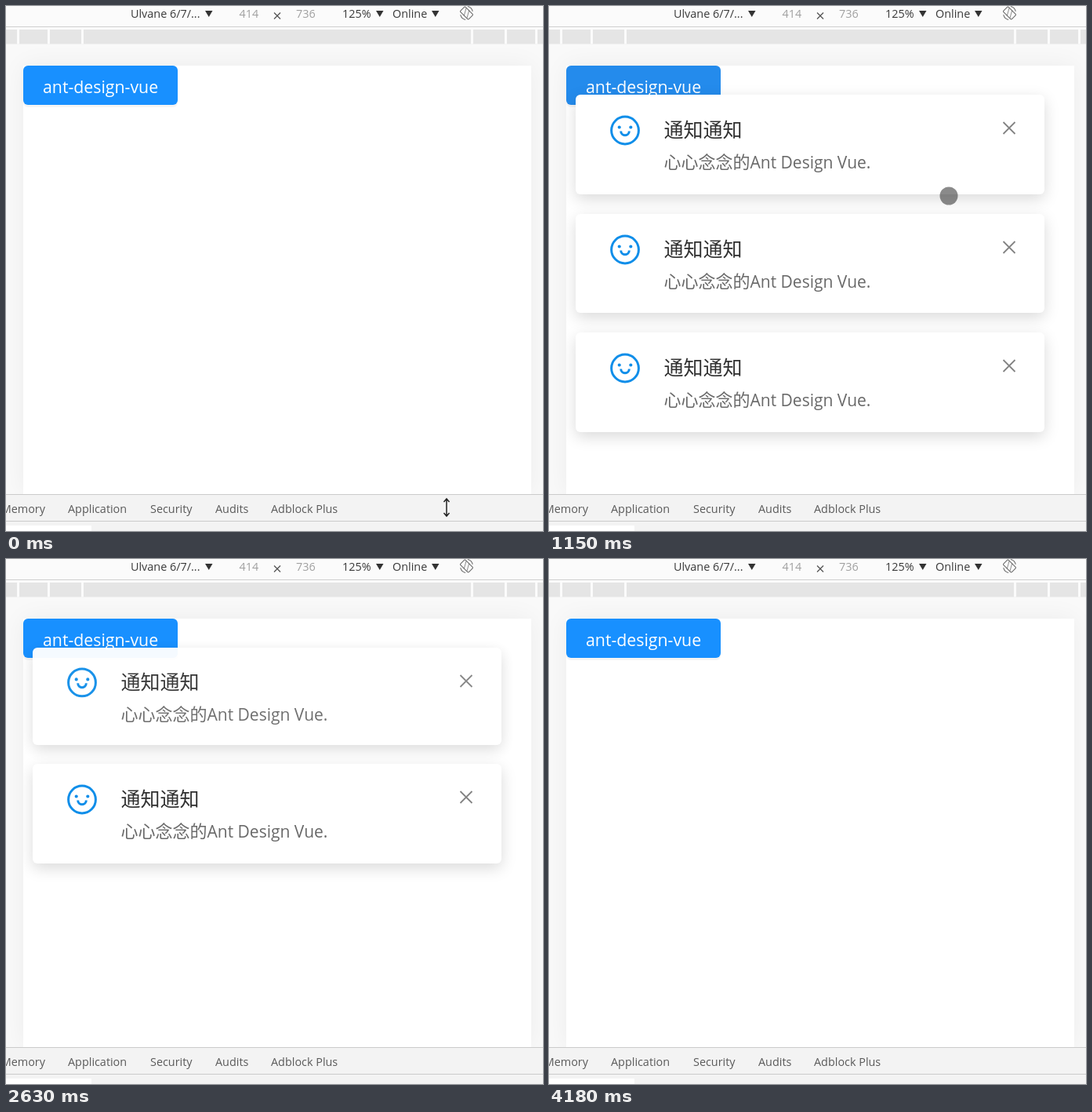
Recreate the animation shown at these times as an HTML page. Size 685x669 px, loop 4.73 s.

```html
<!DOCTYPE html>
<html lang="en">
<head>
<meta charset="utf-8">
<title>Notification demo</title>
<style>
  html, body { margin: 0; width: 100%; height: 100%; overflow: hidden; background: #f9f9f9; }
  body { position: relative; font-family: "Open Sans", "Noto Sans", sans-serif; }
  svg { position: absolute; left: 0; top: 0; overflow: hidden; }
  #device {
    position: absolute; left: 22px; top: 76px; width: 648px; height: 546px;
    overflow: hidden; background: #fff; box-shadow: 0 0 30px rgba(0, 0, 0, .055);
  }
  #button {
    position: absolute; left: 0; top: 0; width: 197px; height: 50px;
    border-radius: 6px; box-shadow: 0 3px 0 rgba(0, 0, 0, .045);
  }
  .notice {
    position: absolute; width: 598px; overflow: hidden; background: #fff;
    border-radius: 6px; box-shadow: 0 6px 19px rgba(0, 0, 0, .15);
  }
  .close { stroke: #838383; stroke-width: 1.8; }
  .ring { display: none; fill: none; stroke: #dfa23c; stroke-width: 1.8; }
  .focused .close { stroke: #5a5a5a; }
  .focused .ring { display: inline; }
  .cjk { font-family: "Noto Sans CJK SC", "Noto Sans CJK", sans-serif; }
  .ui text { font-size: 14.4px; fill: #5a5a5a; }
  .ui .dim { fill: #a0a0a0; }
  .ui .dark { fill: #3a3a3a; }
</style>
</head>
<body>
<div id="device">
  <div id="button">
    <svg width="197" height="50"><text x="25" y="34.5" font-size="21.3" fill="#fff">ant-design-vue</text></svg>
  </div>
</div>

<svg class="ui" width="685" height="669">
  <rect width="685" height="49" fill="#fbfbfb"/>
  <rect y="26" width="685" height="1" fill="#cfcfcf"/>
  <rect y="30" width="685" height="18.5" fill="#e5e5e5"/>
  <g id="gaps" fill="#fbfbfb"></g>
  <text class="dark" x="159" y="15">Ulvane 6/7/...</text>
  <text class="dim" x="297.5" y="15">414</text>
  <path d="M342 8.500l8 8m0-8l-8 8" stroke="#555" stroke-width="1.3"/>
  <text class="dim" x="370" y="15">736</text>
  <text class="dark" x="429" y="15">125%</text>
  <text class="dark" x="493" y="15">Online</text>
  <path d="M254 6h9.500l-4.750 8zM472 6h9.500l-4.750 8zM543 6h9.500l-4.750 8z" fill="#333"/>
  <g transform="translate(587.5 9) rotate(-45)" fill="none" stroke="#666">
    <rect x="-4.500" y="-7.500" width="9" height="15" rx="1.500"/>
    <path d="M-4.500 0l9 -5M-4.500 5l9 -5" stroke-width=".7"/>
    <path d="M7 -5a8.500 8.500 0 0 1 0 9M-7 5a8.500 8.500 0 0 1 0 -9"/>
  </g>

  <rect y="622" width="685" height="47" fill="#f3f3f3"/>
  <rect y="622" width="685" height="1" fill="#cbcbcb"/>
  <rect y="656" width="685" height="1" fill="#cbcbcb"/>
  <rect y="662" width="109" height="7" fill="#fff"/>
  <text x="50" y="646" text-anchor="end">Memory</text>
  <text x="79" y="646">Application</text>
  <text x="184" y="646">Security</text>
  <text x="267" y="646">Audits</text>
  <text x="338" y="646">Adblock Plus</text>

  <g id="cursor">
    <path id="resize" d="M0 -10V10M-3.500 -7L0 -11L3.500 -7M-3.500 7L0 11L3.500 7" fill="none" stroke="#222" stroke-width="1.5"/>
    <g id="touch">
      <circle id="halo" r="15" fill="rgba(245,245,20,.58)"/>
      <circle id="dot" r="11.5"/>
    </g>
    <path id="beam" d="M-4 -11.500h3l1 1l1 -1h3M0 -10.500V10.500M-4 11.500h3l1 -1l1 1h3" fill="none" stroke="#222" stroke-width="1.6"/>
  </g>
</svg>

<script>
const LOOP = 4730, TICK = 1000 / 13, FADE = 240;
const HEIGHT = 126.5, GAP = 25, SLIDE = 600;
const BLUE = [24, 144, 255], PRESSED = [9, 109, 217], FOCUSED = [64, 169, 255];

const taps = [0, 1, 2].map(i => 530 + 155 * i);
const closeTap = 1610, closeStart = 1669;
const leaves = [2563, closeStart, 3912];

// Where the pointer rests or turns.
const stops = [
  { t: 0, x: 562, y: 639 }, { t: 535, x: 156, y: 95 }, { t: 930, x: 156, y: 95 },
  { t: 1154, x: 510, y: 242 }, { t: 1400, x: 587, y: 307 },
  { t: 1690, x: 587, y: 307 }, { t: 1769, x: 605, y: 307 }
];

const $ = id => document.getElementById(id);
const mix = (a, b, k) => a + (b - a) * k;
const mixColor = (a, b, k) => a.map((v, i) => mix(v, b[i], k));
const clamp = v => Math.min(1, Math.max(0, v));
const ease = v => v < .5 ? 4 * v ** 3 : 1 - (2 - 2 * v) ** 3 / 2;
const progress = (t, start) => ease(clamp((t - start) / FADE));
const show = (el, on) => { el.style.display = on ? "" : "none"; };

function pointerAt(t) {
  const i = stops.findIndex(s => s.t > t);
  if (i < 0) return stops.at(-1);
  const a = stops[i - 1], b = stops[i], k = (t - a.t) / (b.t - a.t), out = k * (2 - k);
  return { x: mix(a.x, b.x, out), y: mix(a.y, b.y, out) };
}

function makeNotice(enter, i) {
  const el = document.createElement("div");
  el.className = "notice";
  el.innerHTML = `<svg width="598" height="127">
    <g class="content">
      <g transform="translate(63 45.5)" fill="none" stroke="#108ee9" stroke-width="3">
        <circle r="17.4"/>
        <path d="M-5.300 .9a5.300 5.300 0 0 0 10.600 0"/>
        <path d="M-7.300 -4h.01M7.300 -4h.01" stroke-width="4.2" stroke-linecap="round"/>
      </g>
      <text class="cjk" x="112.5" y="54" font-size="25" fill="#303030">通知通知</text>
      <text x="112.5" y="94" font-size="21" fill="#696969"><tspan class="cjk" font-size="22">心心念念的</tspan>Ant Design Vue.</text>
    </g>
    <path class="close" d="M545.500 35l15 15m0 -15l-15 15"/>
    <rect class="ring" x="541.5" y="25" width="23" height="32.5" rx="2"/>
  </svg>`;
  $("device").append(el);
  return { el, content: el.querySelector(".content"), enter, leave: leaves[i] };
}

function drawNotices(t) {
  let top = 37;
  for (const { el, content, enter, leave } of notices) {
    const visible = t >= enter && t < leave + FADE;
    show(el, visible);
    if (!visible) continue;
    const seen = progress(t, enter), gone = progress(t, leave);
    const height = Math.min(HEIGHT - 2 * GAP * gone, 234 * (1 - gone));
    Object.assign(el.style, {
      left: 12 + SLIDE * (1 - seen) + "px",
      top: top + "px",
      height: height + "px",
      opacity: seen * (1 - gone)
    });
    content.setAttribute("transform", `translate(0 ${-GAP * gone})`);
    el.classList.toggle("focused", leave === closeStart && t >= leave);
    top += height + GAP * (1 - gone);
  }
}

function drawButton(t) {
  let color = mixColor(BLUE, PRESSED, progress(t, taps[0]));
  color = mixColor(color, FOCUSED, progress(t, 1034));
  color = mixColor(color, BLUE, progress(t, closeStart));
  $("button").style.background = `rgb(${color.map(Math.round)})`;
}

function drawCursor(t) {
  const { x, y } = pointerAt(t);
  const pressed = [...taps, closeTap].some(tap => t >= tap && t < tap + TICK);
  $("cursor").setAttribute("transform", `translate(${x} ${y})`);
  show($("resize"), t < TICK);
  show($("touch"), t >= TICK && t < 1769);
  show($("halo"), pressed);
  $("dot").setAttribute("fill", pressed ? "rgba(100,115,10,.6)" : "rgba(60,60,60,.6)");
  show($("beam"), t >= 1769 && t < 1840);
}

function draw(t) {
  drawButton(t);
  drawNotices(t);
  drawCursor(t);
}

// Breakpoint gaps mirror around the middle of the ruler.
for (const offset of [248.5, 291.5, 330.5]) {
  for (const side of [-1, 1]) {
    $("gaps").innerHTML += `<rect x="${344.5 + side * offset + 0}" y="30" width="3" height="18.5"/>`;
  }
}
const notices = taps.map((tap, i) => makeNotice(tap + 75, i));

const start = performance.now();
function frame() {
  const t = (performance.now() - start) % LOOP;
  draw(Math.floor((t + 8) / TICK) * TICK);
  requestAnimationFrame(frame);
}
frame();
</script>
</body>
</html>
```
